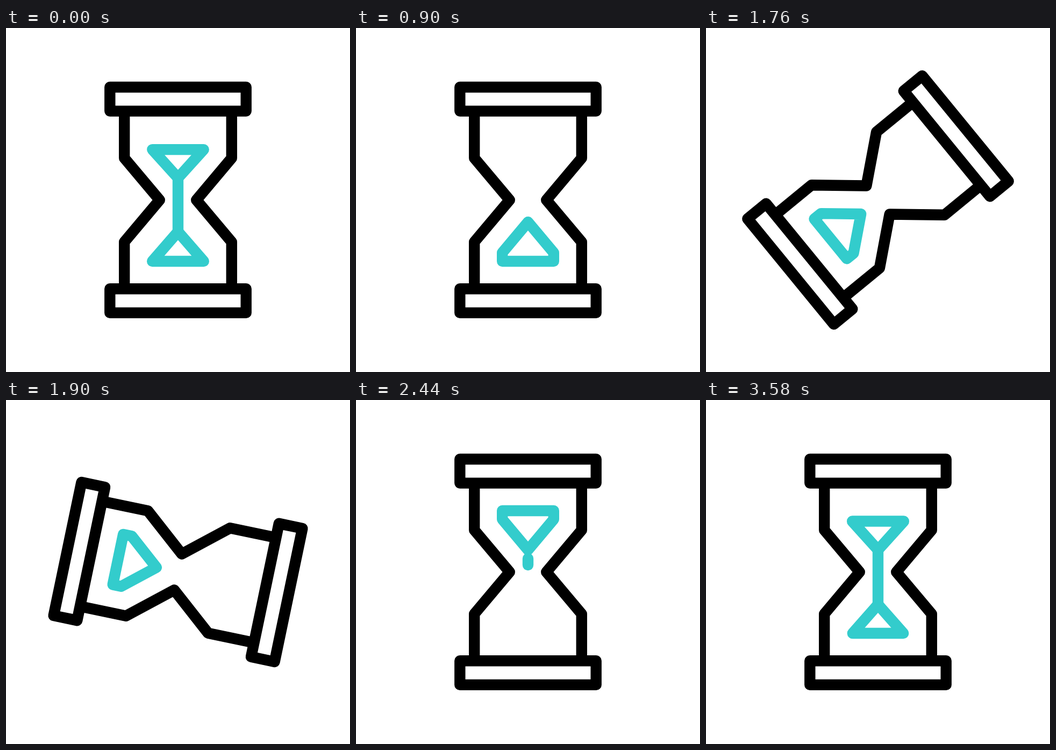
These frames come from a looping animation (640 px wide and 640 px high, 3.6 s). An HTML page with a canvas:

```html
<!DOCTYPE html>
<html lang="en">
<head>
<meta charset="utf-8">
<title>Hourglass</title>
<style>
html, body { margin: 0; width: 100%; height: 100%; overflow: hidden; background: #fff; }
canvas { display: block; width: 640px; height: 640px; }
</style>
</head>
<body>
<canvas id="stage" width="640" height="640"></canvas>
<script>
const ctx = document.getElementById('stage').getContext('2d');
const LOOP = 3600, MID = 320, TURN_START = 1400, TURN_TIME = 940;
const FLOW_START = TURN_START + TURN_TIME, FLOW_END = LOOP + 900, TAIL_START = LOOP + 605;
const NECK = 279, FLOOR = 434, HALF = 47.8, SPEED = 161 / 580;
const INK = '#000', SAND = '#33cccc';

const lerp = (a, b, p) => a + (b - a) * p;
const progress = (t, from, to) => Math.min(1, Math.max(0, (t - from) / (to - from)));

// Cubic Bezier (.5, 0, .5, 1), solved for x by bisection.
function ease(x) {
  let low = 0, high = 1;
  for (let i = 0; i < 30; i++) {
    const s = (low + high) / 2;
    if (1.5 * s * (1 - s) + s ** 3 < x) low = s; else high = s;
  }
  return low * low * (3 - 2 * low);
}

function stroke(points, closed) {
  ctx.beginPath();
  points.forEach(([x, y]) => ctx.lineTo(x, y));
  if (closed) ctx.closePath();
  ctx.stroke();
}

// Closed outline mirrored about the centre line, from an apex and left-hand corners.
function heap(apex, corners) {
  const right = corners.map(([x, y]) => [2 * MID - x, y]).reverse();
  stroke([[MID, apex], ...corners, ...right], true);
}

function drawFrame() {
  ctx.strokeStyle = INK;
  ctx.lineCap = 'butt';
  for (const side of [-1, 1]) {
    const wall = MID + side * 99.8;
    stroke([[wall, 155], [wall, 242], [MID + side * 34.2, MID], [wall, 398], [wall, 485]]);
  }
  for (const y of [110, 485.3]) ctx.strokeRect(193.3, y, 253.4, 44.6);
}

function drawTop(t) {
  if (t >= TAIL_START) return;
  const settle = progress(t, 2920, LOOP);
  const drain = progress(t, LOOP, TAIL_START);
  const x = lerp(MID - HALF, MID, drain);
  const corner = y => [x, lerp(lerp(y, 226, settle), NECK, drain)];
  heap(NECK, [corner(222), corner(206)]);
}

function drawBottom(t) {
  if (t < 2850) return FLOOR;
  const half = HALF * Math.sqrt(progress(t, 2850, LOOP));
  const fill = progress(t, LOOP, FLOW_END);
  const apex = lerp(lerp(FLOOR, 379, progress(t, 2910, LOOP)), 361, fill);
  heap(apex, [[MID - half, lerp(FLOOR, 418, fill)], [MID - half, FLOOR]]);
  return apex;
}

function drawStream(t, bottom) {
  const front = NECK + (t - FLOW_START) * SPEED;
  const tail = NECK + Math.max(0, t - TAIL_START) * SPEED;
  const pieces = [[front - 12, front], [front - 55, front - 43], [tail, front - 88]];
  for (const [from, to] of pieces) {
    const a = Math.max(NECK, from), b = Math.min(bottom, to);
    if (b > a) stroke([[MID, a], [MID, b]]);
  }
}

function draw(time) {
  const t = time < TURN_START ? time + LOOP : time;
  ctx.setTransform(1, 0, 0, 1, 0, 0);
  ctx.fillStyle = '#fff';
  ctx.fillRect(0, 0, 640, 640);
  ctx.lineWidth = 20.4;
  ctx.lineJoin = 'round';

  const turning = t < FLOW_START;
  if (turning) {
    ctx.translate(MID, MID);
    ctx.rotate(Math.PI * ease((t - TURN_START) / TURN_TIME));
    ctx.translate(-MID, -MID);
  }
  drawFrame();
  ctx.strokeStyle = SAND;
  ctx.lineCap = 'round';
  if (turning || t >= FLOW_END) {
    drawBottom(FLOW_END);
  } else {
    drawTop(t);
    drawStream(t, drawBottom(t));
  }
}

const start = performance.now();
function tick() {
  draw((performance.now() - start) % LOOP);
  requestAnimationFrame(tick);
}
tick();
</script>
</body>
</html>
```
